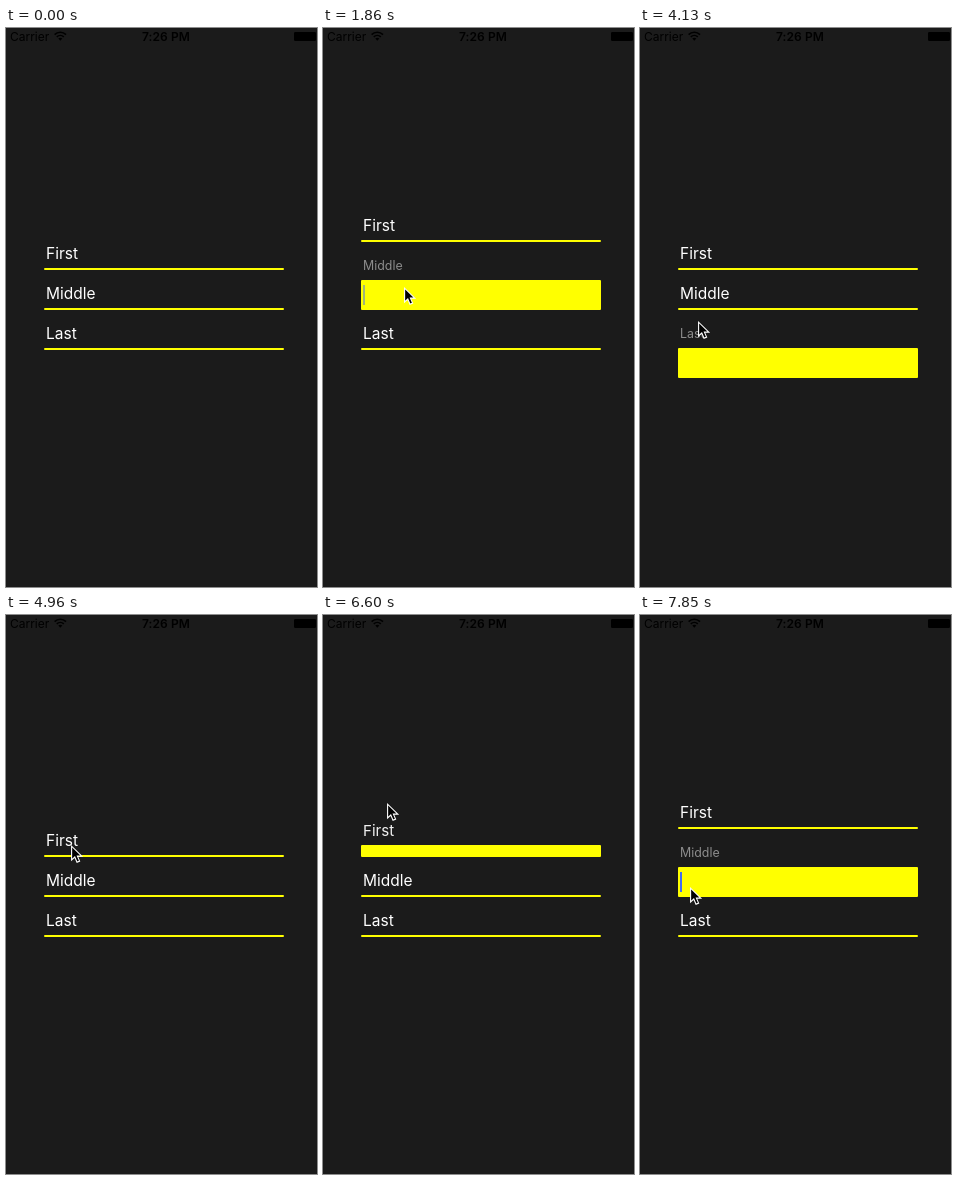
Write an HTML page that moves like this. It is 311 px wide and 559 px high and loops after 8 s.

```html
<!DOCTYPE html>
<html lang="en">
<head>
<meta charset="utf-8">
<title>Expanding fields</title>
<style>
  html, body { margin: 0; width: 100%; height: 100%; overflow: hidden; background: #1b1b1b; }
  body { position: relative; font-family: Inter, Roboto, sans-serif; }
  .status, .label, .bar, .caret, svg { position: absolute; }
  .status { top: 0; line-height: 17px; font-size: 12px; color: #000; white-space: nowrap; }
  .carrier { left: 4px; }
  .clock { left: 136px; font-weight: 600; letter-spacing: .1px; }
  .label { left: 40px; line-height: 20px; font-size: 15.5px; white-space: nowrap; transform-origin: 0 50%; }
  .bar { left: 38px; width: 240px; background: #ff0; border-radius: 1px; }
  .caret { left: 40px; width: 2px; height: 20px; background: #426bf2; }
  svg { left: 0; top: 0; overflow: visible; }
</style>
</head>
<body>
<div class="status carrier">Carrier</div>
<div class="status clock">7:26 PM</div>
<svg width="311" height="17">
  <g fill="none" stroke="#000" stroke-width="1.6">
    <path d="M48.6 6.6a8 8 0 0 1 11.4 0"/>
    <path d="M50.8 8.9a5 5 0 0 1 7 0"/>
  </g>
  <path d="M54.3 12.8l-2-2.2a3 3 0 0 1 4 0z"/>
  <rect x="288" y="4" width="22" height="9" rx="1.2"/>
</svg>
<div id="form"></div>
<svg id="cursor" width="12" height="18">
  <path d="M.6 1.2V15L3.8 12 6 17.2 8.6 16.1 6.4 11.1H10.8Z" fill="#000" stroke="#fff" stroke-width="1.1"/>
</svg>
<script>
const LOOP = 8000, TICK = 206.5, SLIDE = 1.56, LINE = 2;

// start, end, x, y
const moves = [
  [2, 2, 260, 336], [2, 5, 74, 269], [7, 9, 81, 259],
  [9, 12, 76, 235], [12, 15, 58, 293], [22, 26, 66, 221],
  [27, 30, 64, 150], [31, 32, 64, 188], [32, 34, 50, 272]
];

// spans: opened at, closed at
const fields = [
  { name: 'First', y: 240, size: 80, spans: [[25.2, 31]] },
  { name: 'Middle', y: 280, size: 30, spans: [[6, 11.2], [35.4, Infinity]] },
  { name: 'Last', y: 320, size: 30, down: true, spans: [[16.4, 21.2]] }
];

const form = document.getElementById('form');
const cursor = document.getElementById('cursor');

const clamp = x => Math.min(1, Math.max(0, x));
const mix = (a, b, p) => a + (b - a) * p;
const easeOut = (x, power) => 1 - (1 - clamp(x)) ** power;

function add(cls, text = '') {
  const el = document.createElement('div');
  el.className = cls;
  el.textContent = text;
  form.append(el);
  return el;
}

for (const f of fields) {
  f.bar = add('bar');
  f.label = add('label', f.name);
}
const caret = add('caret');

function drawForm(n) {
  let lift = 0;
  caret.style.opacity = 0;

  // Work upward: an open field pushes those above it.
  for (const f of [...fields].reverse()) {
    const [from, to] = f.spans.findLast(s => s[0] <= n) || [n, n];
    const p = easeOut((n - from) / SLIDE, 2) - easeOut((n - to) / SLIDE, 2);
    const h = Math.round(mix(LINE, f.size, p));
    const grow = f.down ? 0 : h - LINE;
    const top = f.y - lift - grow;
    const grey = mix(255, 140, p);

    f.bar.style.top = top + 'px';
    f.bar.style.height = h + 'px';
    f.label.style.top = top - 24 + 'px';
    f.label.style.transform = p ? `scale(${mix(1, .8, p)})` : 'none';
    f.label.style.color = `rgb(${grey},${grey},${grey})`;
    if (p === 1) {
      caret.style.top = top + h / 2 - 10 + 'px';
      caret.style.opacity = clamp((3.2 - (n - from) % 5) * 2.5);
    }
    lift += grow;
  }
}

function drawCursor(n) {
  let x = 0, y = 0;
  for (const [start, end, toX, toY] of moves) {
    if (n < start) break;
    const p = end > start ? easeOut((n - start) / (end - start), 3) : 1;
    x = mix(x, toX, p);
    y = mix(y, toY, p);
  }
  cursor.style.visibility = n < moves[0][0] ? 'hidden' : 'visible';
  cursor.style.transform = `translate(${Math.round(x)}px, ${Math.round(y)}px)`;
}

const start = performance.now();

function frame(now) {
  const t = Math.max(0, now - start) % LOOP;
  const n = Math.floor((t + 12) / TICK);
  drawForm(n);
  drawCursor(n);
  requestAnimationFrame(frame);
}
frame(start);
</script>
</body>
</html>
```
